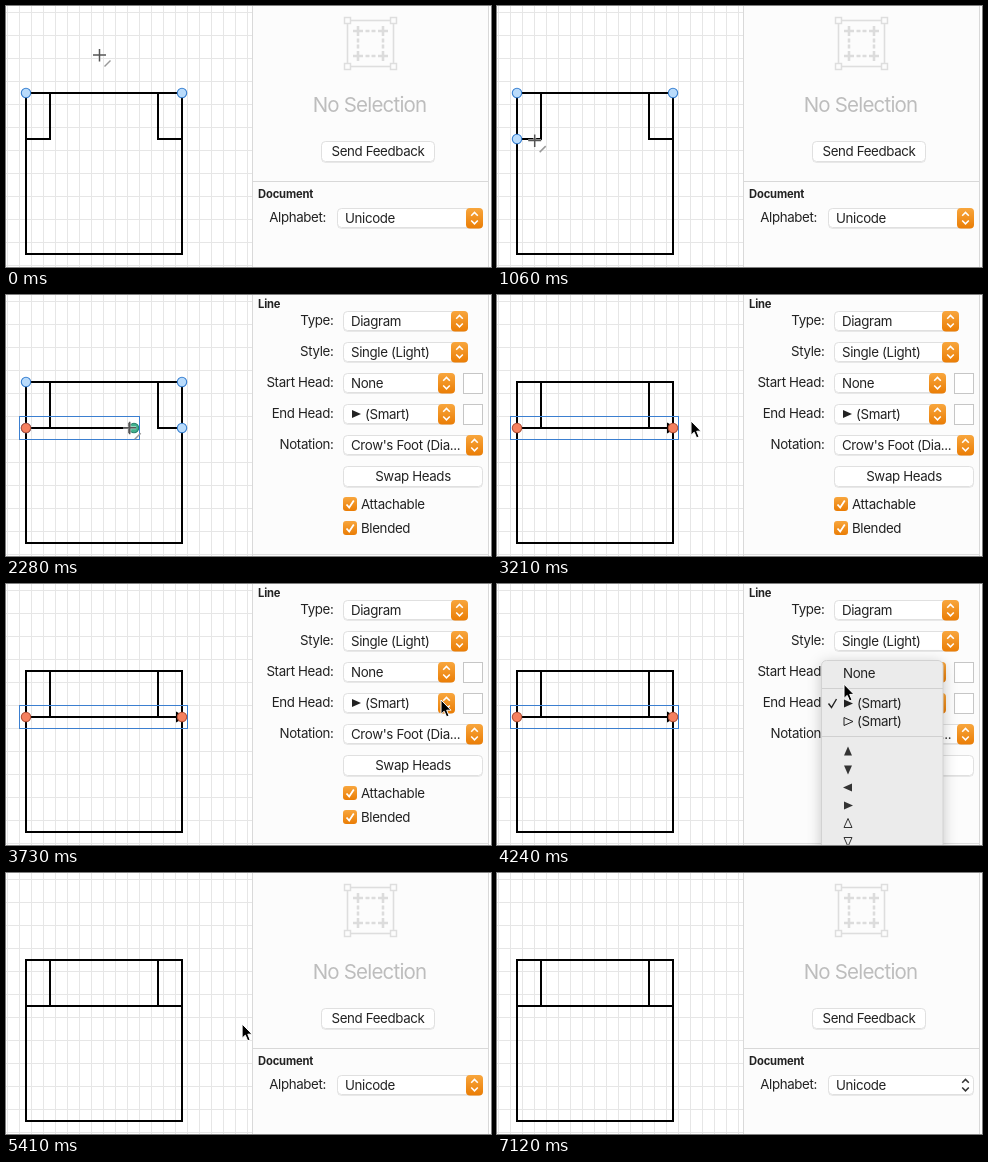
Animation of 485x261 px, one loop 7.22 s. Source, as an HTML page:

```html
<!DOCTYPE html>
<html lang="en">
<head>
<meta charset="utf-8">
<title>Removing an arrow head from a diagram line</title>
<style>
  html, body { margin: 0; width: 100%; height: 100%; overflow: hidden; background: #fff; }
  svg { display: block; }
  text { font: 13.3px Inter, "Liberation Sans", sans-serif; letter-spacing: -.35px; fill: #222; white-space: pre; }
  .head { font-size: 11.2px; font-weight: 700; letter-spacing: -.15px; }
  .big { font-size: 20.5px; letter-spacing: -.8px; fill: #bdbdbd; }
  .shadow { filter: drop-shadow(0 3px 7px rgba(0, 0, 0, .22)); }
</style>
</head>
<body>
<svg width="485" height="261" viewBox="0 0 485 261">
  <defs>
    <linearGradient id="orange" x2="0" y2="1">
      <stop stop-color="#f8a63d"/><stop offset="1" stop-color="#ea7d05"/>
    </linearGradient>
  </defs>
  <g id="scene"></g>
</svg>
<script>
const LOOP = 7220, STEP = 56;
const CELL = 12, ROW = 23, LEFT = 20, RIGHT = LEFT + 13 * CELL, TOP = 87, MID = TOP + 2 * ROW, BOTTOM = TOP + 7 * ROW;
const T = { near: 900, draw: 1760, reach: 2100, release: 2970, arrow: 3210, menu: 3790, pick: 4580,
            fade: 4690, apply: 5050, deselect: 5290, inactive: 7120 };

// Pointer moves: start, end, destination
const MOVES = [
  [600, 1060, 37, 135], [1120, 1290, 24, 137], [1410, 1460, 21, 134],
  [1940, 2620, 174, 132], [2680, 2790, 178, 131], [2970, 3030, 182, 136],
  [3210, 3210, 194, 126], [3270, 3730, 436, 116],
  [4090, 4210, 346, 100], [4270, 4350, 344, 91],
  [4580, 4810, 258, 147], [4870, 5050, 246, 150],
  [5230, 5410, 236, 151], [6070, 6470, 437, 261]
];

function pointer(t) {
  let x = 93, y = 49;
  for (const [start, end, toX, toY] of MOVES) {
    if (t < start) break;
    const steps = Math.floor((t - start) / STEP) + 1;
    const u = Math.min(1, steps * STEP / (end - start + STEP));
    const eased = 1 - (1 - u) ** 1.45;
    x += (toX - x) * eased;
    y += (toY - y) * eased;
  }
  return [x, y];
}

const rect = (x, y, w, h, fill, extra = '') =>
  `<rect x="${x}" y="${y}" width="${w}" height="${h}" fill="${fill}" ${extra}/>`;
const path = (d, stroke, width = 1, extra = 'fill="none"') =>
  `<path d="${d}" stroke="${stroke}" stroke-width="${width}" ${extra}/>`;
const text = (x, y, s, extra = '') => `<text x="${x}" y="${y}" ${extra}>${s}</text>`;
const label = (x, y, s) => text(x, y, s, 'text-anchor="end"');
const dot = (x, y, fill, stroke) =>
  `<circle cx="${x}" cy="${y}" r="4.7" fill="${fill}" stroke="${stroke}" stroke-width="1.1"/>`;
const blue = (x, y) => dot(x, y, '#b9dbfb', '#3b82d2');
const red = (x, y) => dot(x, y, '#f5805f', '#b5533a');
const green = (x, y) => dot(x, y, '#40b28d', '#24806a');
const triangle = (x, y, turn = 0, fill = '#222', open = false) =>
  `<path d="M-4-4L5 0-4 4z" transform="translate(${x} ${y}) rotate(${turn})"
    fill="${open ? 'none' : fill}" stroke="${open ? fill : 'none'}"/>`;

const frame = (x, y, w, h, fill = '#fff') =>
  rect(x + .5, y + 1, w - 1, h - .5, 'none', 'rx="4" stroke="#000" stroke-opacity=".08"') +
  rect(x + .5, y + .5, w - 1, h - 1, fill, 'rx="4" stroke="#e0e0e0"');

const button = (x, y, w, s) =>
  frame(x, y, w, 21) + text(x + w / 2, y + 15, s, 'text-anchor="middle"');

function popup(x, y, w, s, { fill, active = true, tri = false } = {}) {
  const cx = x + w - 8.5, cy = y + 10;
  return frame(x, y, w, 20, fill) +
    (active ? rect(x + w - 17, y, 17, 20.5, 'url(#orange)', 'rx="4"') : '') +
    path(`M${cx - 3.3} ${cy - 2.2}l3.3-3.4 3.3 3.4m-6.6 4.6l3.3 3.4 3.3-3.4`, active ? '#fff' : '#333', 1.5) +
    (tri ? triangle(x + 13, cy) : '') + text(x + (tri ? 22 : 8), y + 15, s);
}

const check = (y, s) => rect(337, y, 14, 14, 'url(#orange)', 'rx="3"') +
  path(`M340.5 ${y + 7.5}l2.7 3 4.6-7`, '#fff', 1.8) + text(355, y + 12, s);
const well = y => rect(457.5, y + .5, 19, 20, '#fff', 'stroke="#c6c6c6"');

function grid() {
  let d = '';
  for (let x = 1.5; x < 246; x += CELL) d += `M${x} 0V261`;
  for (let y = 6.5; y < 261; y += ROW) d += `M0 ${y}H246`;
  return path(d, '#e6e6e6');
}

function drawing(t, x) {
  const drawn = t >= T.draw, selected = drawn && t < T.deselect, dragging = t < T.release;
  const end = dragging ? LEFT + CELL * Math.round((x - LEFT) / CELL) : RIGHT;
  const corner = 2 * CELL;
  let s = grid() + path(`M${LEFT} ${TOP}H${RIGHT}V${BOTTOM}H${LEFT}z` +
    `m${corner} 0V${MID}H${LEFT}M${RIGHT - corner} ${TOP}V${MID}H${RIGHT}`, '#000', 2);
  if (drawn) s += path(`M${LEFT} ${MID}H${end}`, '#000', 2);
  if (drawn && t < T.apply) s += `<path d="M${end - 6} ${MID - 5.5}l10 5.5-10 5.5z"/>`;
  if (selected) s += rect(LEFT - 6.5, MID - ROW / 2, end - LEFT + CELL, ROW, 'none', 'stroke="#3b7fd0"');
  if (dragging) {
    s += blue(LEFT, TOP) + blue(RIGHT, TOP);
    if (t >= T.near) s += blue(LEFT, MID);
    if (t >= T.reach) s += blue(RIGHT, MID);
  }
  if (selected) s += red(LEFT, MID) + (dragging ? green : red)(end, MID);
  return s;
}

function emptyPanel(t) {
  let icon = rect(341.5, 14.5, 46, 46, 'none', 'stroke="#dedede" stroke-width="1.6"');
  let marks = '';
  for (const i of [0, 1]) {
    for (const j of [0, 1]) {
      icon += rect(338.5 + 46 * i, 11.5 + 46 * j, 6, 6, '#fcfcfc', 'stroke="#dedede" stroke-width="1.5"');
      marks += `M${347 + 25 * i} ${25 + 25 * j}h10m-5-5v10`;
    }
    marks += `M359.5 ${25 + 25 * i}h4m2 0h4M${352 + 25 * i} 32.5v4m0 2v4`;
  }
  return icon + path(marks, '#dcdcdc', 2.6) +
    text(363.5, 105.5, 'No Selection', 'class="big" text-anchor="middle"') +
    button(315, 135, 114, 'Send Feedback') + path('M247 175.5H482', '#d8d8d8') +
    text(252, 192, 'Document', 'class="head"') + label(320, 216, 'Alphabet:') +
    popup(331, 202, 146, 'Unicode', { active: t < T.inactive });
}

function linePanel(t) {
  const tri = t < T.apply, fill = tri && t >= T.menu ? '#ececec' : '#fff';
  const rows = [
    ['Type:', 125, 'Diagram'], ['Style:', 125, 'Single (Light)'], ['Start Head:', 112, 'None'],
    ['End Head:', 112, tri ? '(Smart)' : 'None', { tri, fill }], ['Notation:', 140, "Crow's Foot (Dia..."]
  ];
  return text(252, 13, 'Line', 'class="head"') +
    rows.map(([name, width, value, style], i) => {
      const y = 16 + 31 * i;
      return label(327.5, y + 14, name) + popup(337, y, width, value, style) + (width === 112 ? well(y) : '');
    }).join('') +
    button(337, 171, 140, 'Swap Heads') + check(202, 'Attachable') + check(226, 'Blended') +
    path('M247 259.5H482', '#dedede');
}

function menu(t, y) {
  const alpha = t < T.fade ? 1 : 1 - (t - T.fade) / 140;
  if (t < T.menu || alpha <= 0) return '';
  const picked = t >= T.pick;
  const onNone = picked ? t >= T.pick + STEP : y < 98;
  const onSmart = !picked && y > 110;
  const ink = on => on ? '#fff' : '#222';
  const words = (x, base, s, on) => text(x, base, s, `style="fill:${ink(on)}"`);
  let s = rect(324.5, 76.5, 121.5, 200, '#ebebeb', 'rx="5" stroke="#d2d2d2" class="shadow"') +
    (onNone ? rect(325, 81, 121, 17.5, '#f0902a') : '') +
    (onSmart ? rect(325, 110, 121, 18, '#f0902a') : '') +
    words(346, 94, 'None', onNone) + path('M325 104.5H446M325 152.5H446', '#d0d0d0') +
    path('M331.5 119.5l3 4 5-8.5', ink(onSmart), 1.4) +
    triangle(351, 119.5, 0, ink(onSmart)) + words(360, 124, '(Smart)', onSmart) +
    triangle(351, 137.5, 0, '#222', true) + words(360, 142, '(Smart)');
  [-90, 90, 180, 0, -90, 90].forEach((turn, i) => s += triangle(351, 167.5 + 18 * i, turn, '#333', i > 3));
  return `<g opacity="${alpha.toFixed(2)}">${s}</g>`;
}

function cursor(t, x, y) {
  const cross = 'M-6 0H7M.5-6V6.5';
  const shape = t < T.arrow
    ? path(cross, '#fff', 3, 'opacity=".6"') + path(cross, '#555', 1.5) + path('M5.5 11.5L11.5 5.5', '#999', 1.5)
    : path('M0 0V14.2L3.2 11.2 5.6 16.8 8 15.8 5.7 10.2H10z', '#fff', 1, '');
  return `<g transform="translate(${x.toFixed(1)} ${y.toFixed(1)})">${shape}</g>`;
}

const scene = document.getElementById('scene');
let last = '';

function render(t) {
  const [x, y] = pointer(t);
  const panel = t >= T.draw && t < T.deselect ? linePanel : emptyPanel;
  const s = drawing(t, x) + rect(246, 0, 237, 261, '#fcfcfc') +
    path('M246.5 0V261M482.5 0V261', '#d9d9d9') + panel(t) + menu(t, y) + cursor(t, x, y);
  if (s !== last) scene.innerHTML = last = s;
}

const begin = performance.now();
(function tick() {
  render((performance.now() - begin) % LOOP);
  requestAnimationFrame(tick);
})();
</script>
</body>
</html>
```
